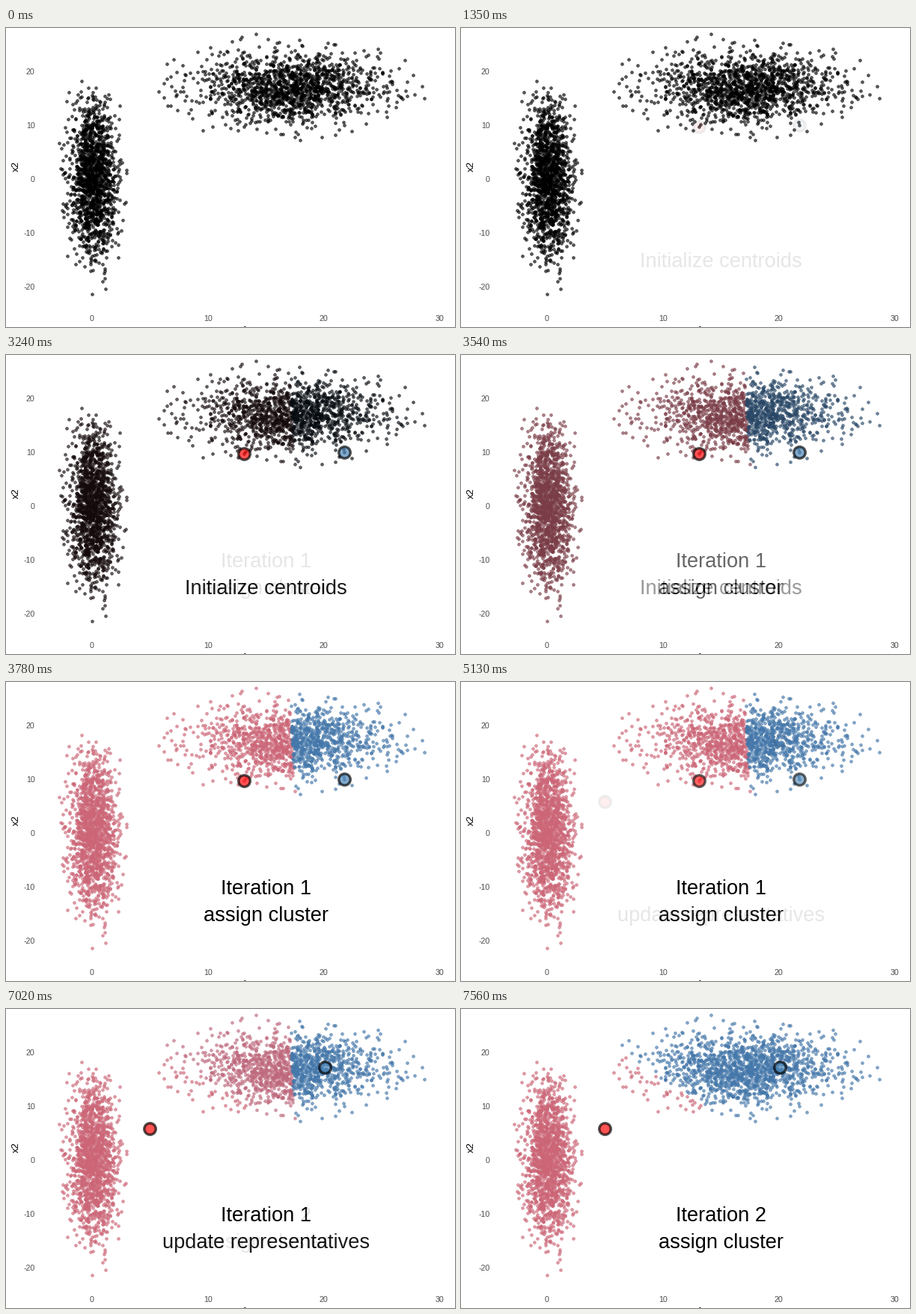
These frames come from a looping animation (600 by 400 pixels, 8000 ms). A matplotlib script:

```python
import numpy as np
import matplotlib.pyplot as plt
from matplotlib.animation import FuncAnimation

W, H, DPI = 600, 400, 100
PT = 72 / DPI                      # points per pixel
LOOP, STEP = 8000, 20              # ms
HOLD, FADE_STEP, FADE_COUNT = 1350, 60, 10
PERIOD = HOLD + FADE_STEP * (FADE_COUNT - 1)

plt.rcParams["font.family"] = "Liberation Sans"

ROSE, BLUE = "#CC6677", "#4477AA"
ORIGIN = np.array([115.5, 202.0])
SCALE = np.array([15.47, -7.2])

# Centroids in data units: (red, blue)
START = np.array([(13.09, 9.7), (21.75, 9.95)])
MOVED = np.array([(4.95, 5.83), (20.07, 17.2)])


def to_px(data):
    return ORIGIN + np.asarray(data) * SCALE


def cloud(rng, center, spread, count, reach=3.15):
    """Normal cloud, standardised so its centre and spread are exact."""
    z = rng.normal(size=(count, 2))
    z = (z - z.mean(axis=0)) / z.std(axis=0)
    z = z[np.hypot(*z.T) < reach]
    return np.array(center) + z * spread


rng = np.random.default_rng(12)
points = np.vstack([
    cloud(rng, (0.05, 0), (1.0, 7.0), 1500),
    cloud(rng, (17.1, 17.0), (3.95, 3.25), 1500),
    START,
])
points = points[rng.permutation(len(points))]


def nearest(centroids):
    gaps = points[:, None] - centroids[None]
    return (gaps ** 2).sum(axis=2).argmin(axis=1)


fig = plt.figure(figsize=(W / DPI, H / DPI), dpi=DPI, facecolor="white")


def stage():
    fig.clear()
    ax = fig.add_axes([0, 0, 1, 1])
    ax.axis("off")
    ax.set(xlim=(0, W), ylim=(H, 0))
    return ax


def draw_axes(ax):
    tick = dict(size=10.6 * PT, color="#4D4D4D", va="center_baseline")
    for v in range(-20, 21, 10):
        ax.text(38.5, to_px((0, v))[1], str(v), ha="right", **tick)
    for v in range(0, 31, 10):
        ax.text(to_px((v, 0))[0] - 0.5, 388, str(v), ha="center", **tick)
    title = dict(size=13.3 * PT, ha="center", va="baseline")
    ax.text(16.5, 185, "x2", rotation=90, rotation_mode="anchor", **title)
    ax.text(317, 408, "x1", **title)


def draw_points(ax, groups):
    xy = to_px(points)
    if groups is None:
        parts = [(xy, "black")]
    else:
        parts = [(xy[groups == 0], ROSE), (xy[groups == 1], BLUE)]
    for part, color in parts:
        ax.plot(*part.T, "o", color=color, alpha=0.65,
                ms=3.8 * PT, mew=0.7 * PT)


def draw_centroids(ax, centroids):
    for spot, color in zip(centroids, ("red", "steelblue")):
        ax.plot(*to_px(spot), "o", mfc=color, mec="black", alpha=0.68,
                ms=15.5 * PT, mew=3.4 * PT)


def render(groups=None, centroids=(), title="", caption=""):
    ax = stage()
    draw_axes(ax)
    draw_points(ax, groups)
    draw_centroids(ax, centroids)
    for y, line in ((284, title), (320, caption)):
        ax.text(347.5, y, line, size=27.3 * PT, ha="center", va="baseline")
    fig.canvas.draw()
    return np.asarray(fig.canvas.buffer_rgba())[..., :3].astype(float)


first, second = nearest(START), nearest(MOVED)
scenes = [
    render(),
    render(None, START, "", "Initialize centroids"),
    render(first, START, "Iteration 1", "assign cluster"),
    render(first, MOVED, "Iteration 1", "update representatives"),
    render(second, MOVED, "Iteration 2", "assign cluster"),
]

view = stage().imshow(scenes[0].astype(np.uint8), extent=(0, W, H, 0),
                      interpolation="nearest", aspect="auto")


def update(i):
    # Each period holds one scene, then steps into the next.
    k, t = divmod(i * STEP + STEP // 2, PERIOD)
    if t < HOLD:
        mix = 0
    else:
        mix = ((t - HOLD) // FADE_STEP + 1) / FADE_COUNT
    after = scenes[min(k + 1, len(scenes) - 1)]
    view.set_data(np.rint((1 - mix) * scenes[k] + mix * after).astype(np.uint8))
    return [view]


anim = FuncAnimation(fig, update, frames=LOOP // STEP, interval=STEP,
                     repeat=True, repeat_delay=0, blit=False)
plt.show()
```
